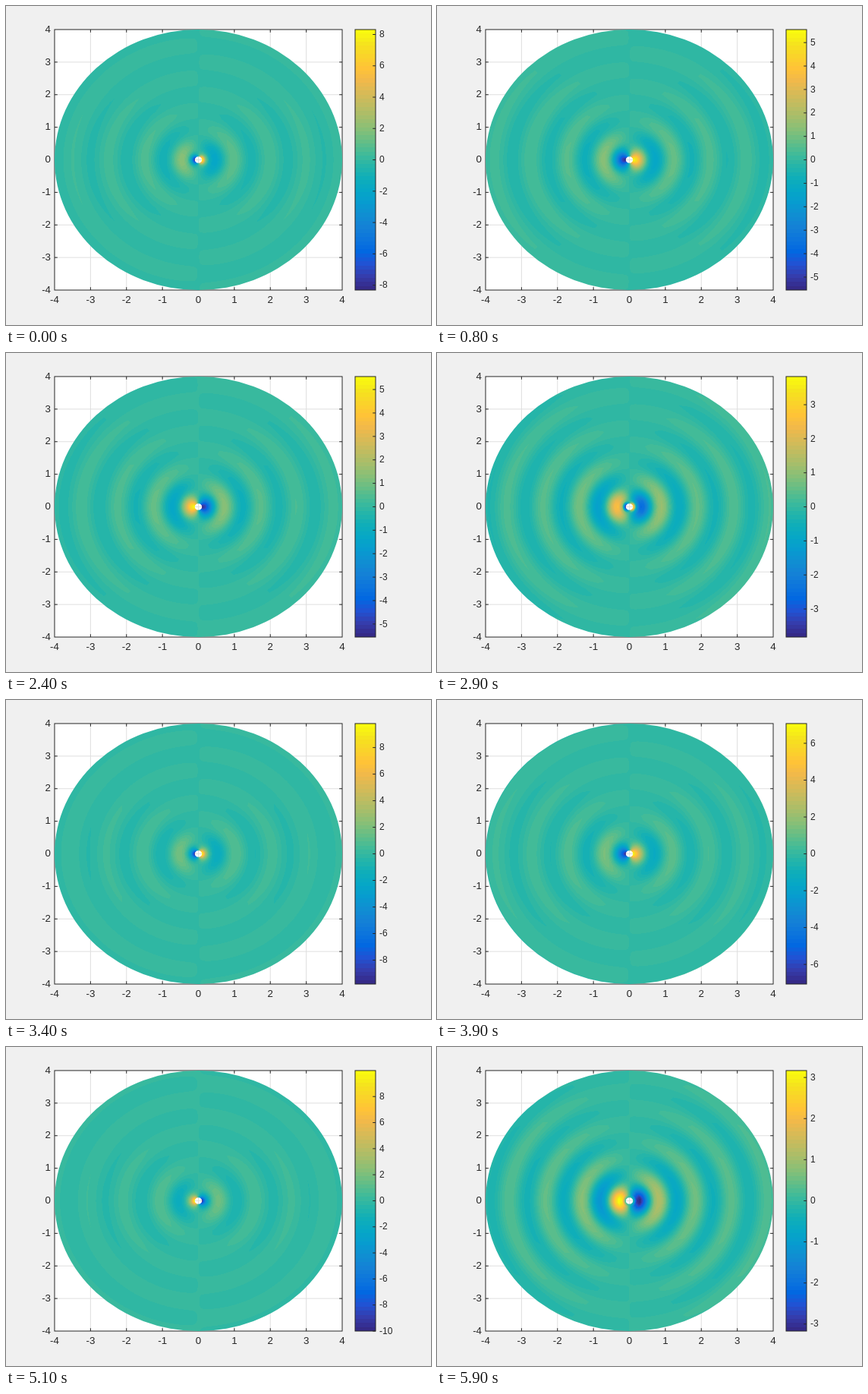
These frames come from a looping animation (560x420 px, 6000 ms). An HTML page with a canvas:

```html
<!DOCTYPE html>
<html lang="en">
<head>
<meta charset="utf-8">
<title>Radiating dipole</title>
<style>
  html, body { margin: 0; width: 560px; height: 420px; overflow: hidden; background: #f0f0f0; }
  canvas { display: block; }
</style>
</head>
<body>
<canvas id="stage" width="560" height="420"></canvas>
<script>
const INK = '#262626', GRID = '#dfdfdf';
const BOX = { left: 64, right: 443, top: 31, bottom: 374 };
const BAR = { left: 460, right: 487 };
const TICK = 3.8;
const LEVELS = 64, FRAME_MS = 100, FRAMES = 60;
const DEG = Math.PI / 180;
const R_MIN = 0.1, R_MAX = 4, R_STEP = 0.1, RINGS = 40;
const width = BOX.right - BOX.left, height = BOX.bottom - BOX.top;
const midX = (BOX.left + BOX.right) / 2, midY = (BOX.top + BOX.bottom) / 2;
const unitX = width / 8, unitY = height / 8;

// Colour map: evenly spaced stops, blended into 64 levels.
const STOPS = [
  [53, 42, 135], [53, 61, 173], [32, 83, 212], [2, 104, 225], [13, 117, 220], [20, 129, 214],
  [16, 142, 210], [7, 156, 207], [6, 167, 198], [15, 174, 185], [37, 181, 169], [66, 187, 152],
  [101, 190, 134], [135, 191, 119], [165, 190, 107], [192, 188, 96], [217, 186, 86], [241, 185, 74],
  [255, 195, 55], [250, 211, 42], [245, 228, 29], [249, 251, 14]
];
const palette = Array.from({ length: LEVELS }, (_, i) => {
  const at = i / 3, a = Math.min(Math.floor(at), STOPS.length - 2);
  return STOPS[a].map((c, k) => Math.round(c + (STOPS[a + 1][k] - c) * (at - a)));
});

const clamp = (v, lo, hi) => Math.max(lo, Math.min(hi, v));

function makeCanvas() {
  const canvas = document.createElement('canvas');
  canvas.width = 560;
  canvas.height = 420;
  return canvas;
}

function rect(g, color, x, y, w, h) {
  g.fillStyle = color;
  g.fillRect(x, y, w, h);
}

// One pixel wide lines centred on fractional positions.
const hLine = (g, color, x, y, length) => rect(g, color, x, y - 0.5, length, 1);
const vLine = (g, color, x, y, length) => rect(g, color, x - 0.5, y, 1, length);

function outline(g, left, right) {
  g.strokeStyle = INK;
  g.lineWidth = 1;
  g.strokeRect(left, BOX.top, right - left, height);
}

function label(g, text, x, y, size, align) {
  g.font = size + 'px "Liberation Sans", Arial, sans-serif';
  g.textAlign = align;
  g.fillStyle = INK;
  g.fillText(text, x, y);
}

const baseline = y => Math.floor(y + 4.2);

function drawBackdrop() {
  const canvas = makeCanvas(), g = canvas.getContext('2d');
  rect(g, '#f0f0f0', 0, 0, 560, 420);
  rect(g, '#fff', BOX.left, BOX.top, width, height);
  for (let v = -3; v <= 3; v++) {
    vLine(g, GRID, midX + v * unitX, BOX.top, height);
    hLine(g, GRID, BOX.left, midY - v * unitY, width);
  }
  for (let v = -4; v <= 4; v++) {
    const x = midX + v * unitX, y = midY - v * unitY;
    if (Math.abs(v) < 4) {
      vLine(g, INK, x, BOX.top, TICK);
      vLine(g, INK, x, BOX.bottom - TICK, TICK);
      hLine(g, INK, BOX.left, y, TICK);
      hLine(g, INK, BOX.right - TICK, y, TICK);
    }
    label(g, v, x, 391, 13.33, 'center');
    label(g, v, 59, baseline(y), 13.33, 'right');
  }
  outline(g, BOX.left, BOX.right);
  for (let i = 0; i < LEVELS; i++) {
    const y = Math.round(BOX.bottom - (i + 1) * height / LEVELS);
    const end = Math.round(BOX.bottom - i * height / LEVELS);
    rect(g, `rgb(${palette[i]})`, BAR.left, y, BAR.right - BAR.left, end - y);
  }
  outline(g, BAR.left, BAR.right);
  return canvas;
}

// Polar position of every pixel of the ring, with a margin for its soft edges.
function mapRing() {
  const cells = [];
  for (let y = BOX.top - 1; y <= BOX.bottom; y++) {
    for (let x = BOX.left - 1; x <= BOX.right; x++) {
      const u = (x + 0.5 - midX) / unitX, v = (midY - y - 0.5) / unitY;
      const r = Math.hypot(u, v);
      if (r < R_MIN - 0.05 || r > R_MAX + 0.05) continue;
      const at = (clamp(r, R_MIN, R_MAX) - R_MIN) / R_STEP;
      const ring = Math.min(Math.floor(at), RINGS - 2);
      cells.push({ offset: (y * 560 + x) * 4, ring, mix: at - ring, cos: u / r });
    }
  }
  return cells;
}

function ringPath() {
  const path = new Path2D();
  for (const r of [R_MAX, R_MIN]) {
    path.moveTo(midX + r * unitX, midY);
    path.ellipse(midX, midY, r * unitX, r * unitY, 0, 0, 2 * Math.PI);
  }
  return path;
}

const stage = document.getElementById('stage').getContext('2d');
const backdrop = drawBackdrop();
const cells = mapRing();
const ringShape = ringPath();
const ringCanvas = makeCanvas();
const ringContext = ringCanvas.getContext('2d');
const image = ringContext.createImageData(560, 420);

// Outgoing wave cos(kr - wt) / r, sampled on the radial mesh.
function sampleWave(frame) {
  const phase = 2.25 + 11.25 * frame;
  return Array.from({ length: RINGS }, (_, i) => {
    const r = R_MIN + i * R_STEP;
    return Math.cos((360 * r - phase) * DEG) / r;
  });
}

// The angular mesh has a vertex at 0 but straddles 180 degrees.
function colorLimits(wave) {
  const max = Math.max(...wave), min = Math.min(...wave);
  const back = Math.cos(Math.PI / 99);
  return [Math.min(min, -max * back), Math.max(max, -min * back)];
}

function drawRing(wave, lo, hi) {
  const data = image.data, scale = LEVELS / (hi - lo);
  for (const { offset, ring, mix, cos } of cells) {
    const value = (wave[ring] + (wave[ring + 1] - wave[ring]) * mix) * cos;
    const color = palette[clamp(Math.floor((value - lo) * scale), 0, LEVELS - 1)];
    data[offset] = color[0];
    data[offset + 1] = color[1];
    data[offset + 2] = color[2];
    data[offset + 3] = 255;
  }
  ringContext.putImageData(image, 0, 0);
  ringContext.globalCompositeOperation = 'destination-in';
  ringContext.fill(ringShape, 'evenodd');
  stage.drawImage(ringCanvas, 0, 0);
}

function drawBarTicks(lo, hi) {
  const step = hi < 3.05 ? 0.5 : hi < 6.1 ? 1 : 2;
  const slack = 1e-6;
  for (let i = Math.ceil((lo - slack) / step); i * step <= hi + slack; i++) {
    const y = BOX.bottom - (i * step - lo) / (hi - lo) * height;
    hLine(stage, INK, BAR.right - TICK, y, TICK);
    label(stage, String(i * step), 492, baseline(y), 12, 'left');
  }
}

let shown = -1;
function tick(now) {
  const frame = Math.floor(Math.max(0, now) / FRAME_MS) % FRAMES;
  if (frame !== shown) {
    shown = frame;
    const wave = sampleWave(frame);
    const [lo, hi] = colorLimits(wave);
    stage.drawImage(backdrop, 0, 0);
    drawRing(wave, lo, hi);
    drawBarTicks(lo, hi);
  }
  requestAnimationFrame(tick);
}
tick(0);
</script>
</body>
</html>
```
